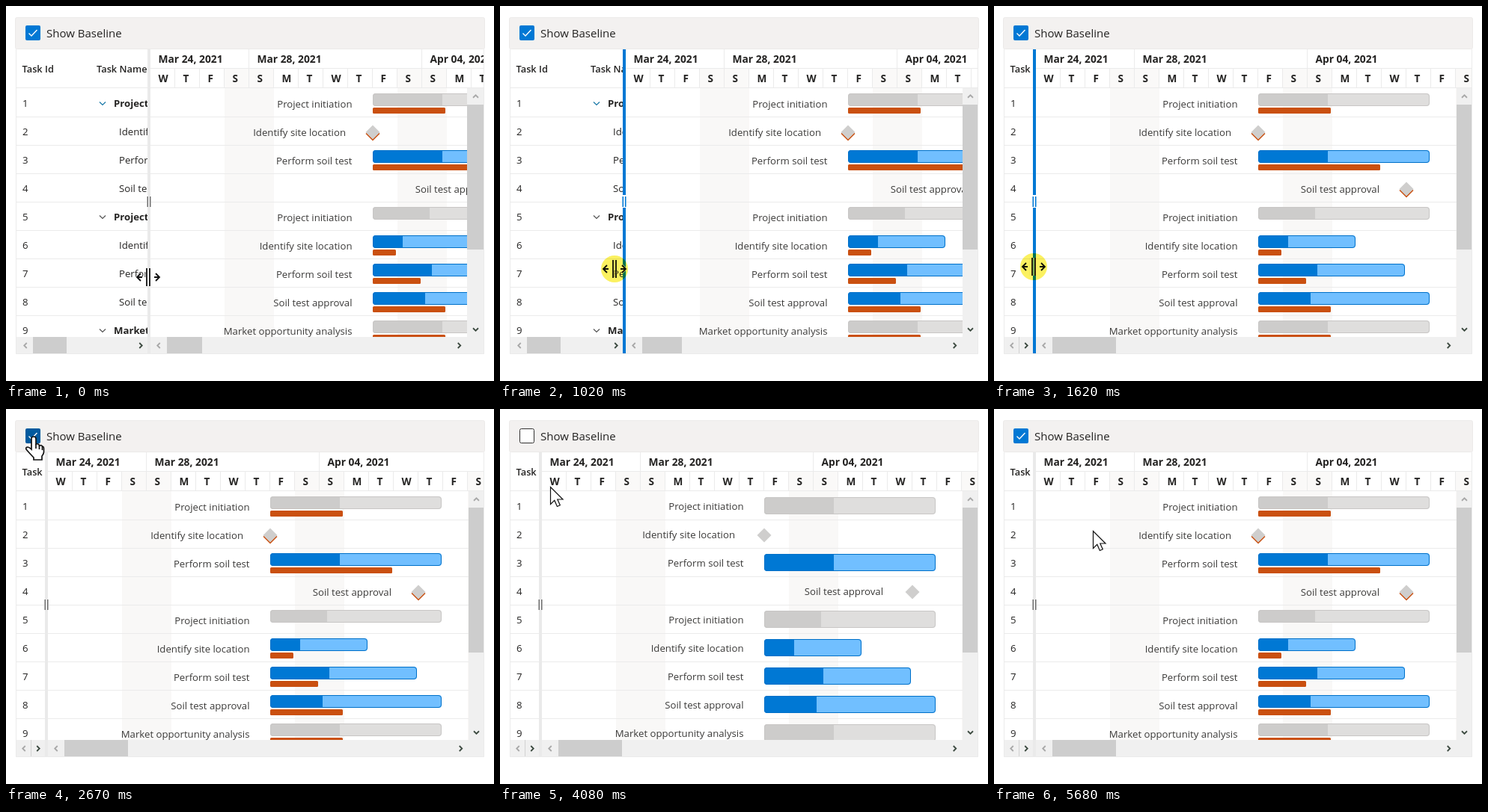
An HTML page with a canvas that plays this animation: 652x502 px, repeating every 6.61 s.

```html
<!DOCTYPE html>
<html lang="en">
<head>
<meta charset="utf-8">
<title>Gantt chart with baseline</title>
<style>
html, body { margin: 0; width: 100%; height: 100%; overflow: hidden; background: #fff; }
canvas { display: block; }
</style>
</head>
<body>
<canvas id="stage" width="652" height="502"></canvas>
<script>
const ctx = document.getElementById('stage').getContext('2d');
const LOOP = 6610, TICK = 200 / 3;
const DAY = 33, ROW = 38, LEFT = 13, RIGHT = 638, BOTTOM = 443;
const BLUE = '#0078d4', ORANGE = '#ca5010', LINE = '#ebebeb', INK = '#242322';

// Bars start on day 9; width, progress and baseline are in pixels.
const tasks = [
  { name: 'Project initiation', parent: true, width: 229, done: 93, base: 97 },
  { name: 'Identify site location', day: 9 },
  { name: 'Perform soil test', width: 229, done: 93, base: 163 },
  { name: 'Soil test approval', day: 15 },
  { name: 'Project initiation', parent: true, width: 229, done: 76, base: 0 },
  { name: 'Identify site location', width: 130, done: 40, base: 31 },
  { name: 'Perform soil test', width: 196, done: 79, base: 64 },
  { name: 'Soil test approval', width: 229, done: 70, base: 97 },
  { name: 'Market opportunity analysis', parent: true, width: 229, done: 93, base: 97 }
];

// Keys: time, splitter centre
const splitKeys = [
  [820, 189], [887, 185], [953, 178], [1020, 166], [1087, 151], [1220, 113],
  [1287, 93], [1353, 79], [1420, 75], [1487, 66], [1553, 58], [1620, 54]
];

// Keys: time, x, y
const cursorKeys = [
  [670, 190, 363], [820, 188, 362], [887, 182, 359], [953, 170, 355], [1020, 153, 352],
  [1353, 78, 350], [1420, 74, 350], [1487, 66, 350], [1620, 53, 349],
  [1760, 42, 349], [1850, 38, 349], [2000, 46, 349], [2140, 54, 349],
  [2220, 64, 343], [2353, 97, 260], [2487, 72, 140], [2553, 52, 80], [2620, 36, 36],
  [3460, 36, 36], [3553, 46, 62], [3753, 84, 128], [3887, 93, 143], [4020, 93, 143],
  [4087, 67, 104], [4153, 52, 78], [4220, 43, 56], [4353, 36, 42], [4487, 34, 37],
  [5220, 34, 37], [5353, 62, 76], [5553, 122, 150], [5687, 132, 163]
];

function at(keys, t) {
  if (t <= keys[0][0]) return keys[0].slice(1);
  for (let i = 1; i < keys.length; i++) {
    const a = keys[i - 1], b = keys[i];
    if (t <= b[0]) {
      const u = (t - a[0]) / (b[0] - a[0]);
      return a.slice(1).map((v, j) => Math.round(v + (b[j + 1] - v) * u));
    }
  }
  return keys[keys.length - 1].slice(1);
}

function rect(x, y, w, h, color) {
  ctx.fillStyle = color;
  ctx.fillRect(x, y, w, h);
}

function rounded(x, y, w, h, r) {
  ctx.beginPath();
  ctx.roundRect(x, y, w, h, r);
}

function text(str, x, y, size, weight = 400, color = INK, align = 'left') {
  ctx.font = `${weight} ${size}px "Open Sans", "Noto Sans", sans-serif`;
  ctx.textAlign = align;
  ctx.fillStyle = color;
  ctx.fillText(str, x, y);
}

function polyline(points, color, width) {
  ctx.beginPath();
  points.forEach(([x, y]) => ctx.lineTo(x, y));
  ctx.strokeStyle = color;
  ctx.lineWidth = width;
  ctx.stroke();
}

function clipped(x, y, w, h, draw) {
  ctx.save();
  ctx.beginPath();
  ctx.rect(x, y, w, h);
  ctx.clip();
  draw();
  ctx.restore();
}

// dx, dy give the pointing direction.
function chevron(x, y, dx, dy, color, size = 3.5, width = 1.8) {
  const tip = size / 2;
  polyline([
    [x - dx * tip - dy * size, y - dy * tip - dx * size],
    [x + dx * tip, y + dy * tip],
    [x - dx * tip + dy * size, y - dy * tip + dx * size]
  ], color, width);
}

function diamond(x, y, color) {
  ctx.beginPath();
  ctx.moveTo(x, y - 9.5);
  ctx.lineTo(x + 9.5, y);
  ctx.lineTo(x, y + 9.5);
  ctx.lineTo(x - 9.5, y);
  ctx.fillStyle = color;
  ctx.fill();
}

function toolbar(checked, hover) {
  rounded(12.5, 15.5, 627, 42, 2);
  ctx.fillStyle = '#f3f1f0';
  ctx.fill();
  ctx.strokeStyle = '#eceae9';
  ctx.lineWidth = 1;
  ctx.stroke();
  if (checked) {
    rounded(26, 26, 20, 20, 2);
    ctx.fillStyle = hover ? '#005a9e' : BLUE;
    ctx.fill();
    polyline([[30.5, 36.5], [34, 40], [41.5, 32]], '#fff', 1.3);
  } else {
    rounded(26.5, 26.5, 19, 19, 2);
    ctx.fillStyle = '#fff';
    ctx.fill();
    ctx.strokeStyle = '#323130';
    ctx.stroke();
  }
  text('Show Baseline', 54, 42, 15);
}

function grid(edge) {
  clipped(LEFT, 58, edge - LEFT, 385, () => {
    text('Task Id', 21.5, 89, 12.8, 600);
    text('Task Name', 121, 89, 12.8, 600);
    tasks.forEach((task, i) => {
      const y = 134.5 + ROW * i;
      text(i + 1, 22, y, 13.2);
      if (task.parent) chevron(129, y - 4, 0, 1, i ? '#555' : '#1878a8', 4, 1.2);
      text(task.name, task.parent ? 144 : 151, y, 13.2, task.parent ? 700 : 400);
      rect(LEFT, 148 + ROW * i, 180, 1, LINE);
    });
    rect(LEFT, 109, 180, 1, LINE);
  });
}

function timeline(start) {
  clipped(start, 58, RIGHT - start, 52, () => {
    for (const day of [3, 10, 17]) rect(start + day * DAY, 84, DAY * 2, 25, '#faf9f8');
    rect(start, 83, 600, 1, LINE);
    rect(start, 109, 600, 1, LINE);
    [['Mar 24, 2021', 0], ['Mar 28, 2021', 4], ['Apr 04, 2021', 11]].forEach(([label, day]) => {
      if (day) rect(start - 1 + day * DAY, 58, 1, 26, LINE);
      text(label, start + 10.5 + day * DAY, 76, 13.8, 700);
    });
    for (let day = 0; day < 18; day++) {
      if (day) rect(start - 1 + day * DAY, 84, 1, 25, LINE);
      text('SMTWTFS'[(day + 3) % 7], start + 10.5 + day * DAY, 102, 13.6, 700);
    }
  });
}

function taskBar(task, x, y, h) {
  const [fill, done, border] = task.parent
    ? ['#dfdedd', '#cdcccb', '#c8c6c5'] : ['#71bfff', BLUE, '#0070c8'];
  ctx.save();
  rounded(x, y, task.width, h, 4);
  ctx.clip();
  rect(x, y, task.width, h, fill);
  rect(x, y, task.done, h, done);
  ctx.restore();
  rounded(x + 0.5, y + 0.5, task.width - 1, h - 1, 3.5);
  ctx.strokeStyle = border;
  ctx.lineWidth = 1;
  ctx.stroke();
}

function chart(start, end, baseline) {
  clipped(start, 110, end - start, BOTTOM - 110, () => {
    for (const day of [3, 10, 17]) rect(start + day * DAY, 110, DAY * 2, 333, '#f9f8f7');
    tasks.forEach((task, i) => {
      const top = 110 + ROW * i, barX = start + 9 * DAY;
      const labelY = top + (baseline ? 26 : 25);
      rect(start, top + 38, 600, 1, LINE);
      let labelX = start + 269.5;
      if (task.day) {
        const x = start + task.day * DAY;
        labelX = x - (baseline ? 36 : 39);
        if (baseline) diamond(x, top + 23, ORANGE);
        diamond(x, top + 21, '#cfcecd');
      } else {
        taskBar(task, barX, top + (baseline ? 7 : 8), baseline ? 17 : 23);
        if (baseline && task.base) {
          rounded(barX, top + 26, task.base, 8, 1.5);
          ctx.fillStyle = ORANGE;
          ctx.fill();
        }
      }
      text(task.name, labelX, labelY, 13.2, 400, '#3b3a39', 'right');
    });
  });
}

function scrollbars(edge, start, end) {
  const track = '#f0f0f0', thumb = '#cdcdcd', pale = '#a8a8a8', dark = '#3c4a40';
  rect(end, 110, RIGHT - end, 355, track);
  rect(end, 132, RIGHT - end, 194, thumb);
  const midX = (end + RIGHT) / 2 + 0.5;
  chevron(midX, 121, 0, -1, pale);
  chevron(midX, 433, 0, 1, dark);

  rect(LEFT, BOTTOM, edge - LEFT, 22, track);
  const gridThumb = Math.min(45, edge - LEFT - 44);
  if (gridThumb > 4) rect(36, BOTTOM, gridThumb, 22, thumb);
  else rect(33, BOTTOM, 1, 22, '#d2d2d2');
  chevron(gridThumb > 4 ? 26 : 24, 454.5, -1, 0, pale);
  chevron(edge - 9, 454.5, 1, 0, dark);

  const view = end - start;
  rect(start, BOTTOM, view, 22, track);
  rect(start + 22, BOTTOM, Math.round(view * (view - 44) / 3425), 22, thumb);
  chevron(start + 11, 454.5, -1, 0, pale);
  chevron(end - 10.5, 454.5, 1, 0, dark);
}

function splitter(x, active) {
  rect(x - 2, 58, 4, 407, active ? BLUE : '#eaeaea');
  rect(x - 3, active ? 253 : 255, 6, active ? 17 : 14, '#fff');
  const color = active ? BLUE : '#6e6e6e';
  rect(x - 2.5, 255, 1.6, 14, color);
  rect(x + 0.9, 255, 1.6, 14, color);
}

const arrowShape = new Path2D('M.5 .5V23.5L5.8 18.4L9.4 26.5L13.3 24.8L9.8 17H17Z');
const handShape = new Path2D('M-2 18V4Q-2 1 1 1Q4 1 4 4V11Q8 10 8.5 13Q12 12 12.5 14' +
  'Q14.5 14 14.5 17V22Q14 25 12 27V32H1V29Q-4 24 -9 18Q-10 15 -7 15Q-5 15 -2 18Z');
const fingers = new Path2D('M4 11V17M8.5 13V18M12.5 14V19');
const resizeShape = new Path2D('M-2 -12V12M2 -12V12' +
  'M-10 -5L-15 0L-10 5M-15 0H-8M10 -5L15 0L10 5M15 0H8');

function cursor(kind, x, y) {
  ctx.save();
  ctx.translate(x, y);
  ctx.strokeStyle = '#111';
  if (kind === 'resize') {
    ctx.strokeStyle = '#fff';
    ctx.lineWidth = 3;
    ctx.stroke(resizeShape);
    ctx.strokeStyle = '#111';
    ctx.lineWidth = 1.8;
    ctx.stroke(resizeShape);
  } else {
    const shape = kind === 'hand' ? handShape : arrowShape;
    ctx.fillStyle = '#fff';
    ctx.fill(shape);
    ctx.lineWidth = kind === 'hand' ? 1.7 : 1.2;
    ctx.stroke(shape);
    if (kind === 'hand') ctx.stroke(fingers);
  }
  ctx.restore();
}

function pressMark(x, y) {
  ctx.save();
  ctx.globalCompositeOperation = 'multiply';
  ctx.beginPath();
  ctx.arc(x, y, 18, 0, Math.PI * 2);
  ctx.fillStyle = '#fbf160';
  ctx.fill();
  ctx.restore();
}

const within = (t, from, to) => t >= from && t < to;

function draw(t) {
  const step = Math.floor((t - 3) / TICK) * TICK + 20;
  const split = t < 820 ? 191 : at(splitKeys, step)[0];
  const [x, y] = at(cursorKeys, step);
  const kind = t < 2210 ? 'resize' : y < 48 ? 'hand' : 'arrow';
  const baseline = !within(t, 3220, 5150);
  const pressed = within(t, 670, 2140) || within(t, 3150, 3280) || within(t, 5080, 5220);
  const edge = split - 2, start = split + 2, end = t < 820 ? 616 : 618;

  rect(0, 0, 652, 502, '#fff');
  toolbar(baseline, kind === 'hand');
  grid(edge);
  timeline(start);
  chart(start, end, baseline);
  scrollbars(edge, start, end);
  rect(LEFT, 58, 1, 407, LINE);
  rect(RIGHT, 58, 1, 407, LINE);
  rect(LEFT, 465, 626, 1, LINE);
  splitter(split, within(t, 670, 2210));
  cursor(kind, x, y);
  if (pressed) pressMark(x, y);
}

const began = performance.now();
function frame() {
  draw((performance.now() - began) % LOOP);
  requestAnimationFrame(frame);
}
frame();
</script>
</body>
</html>
```
